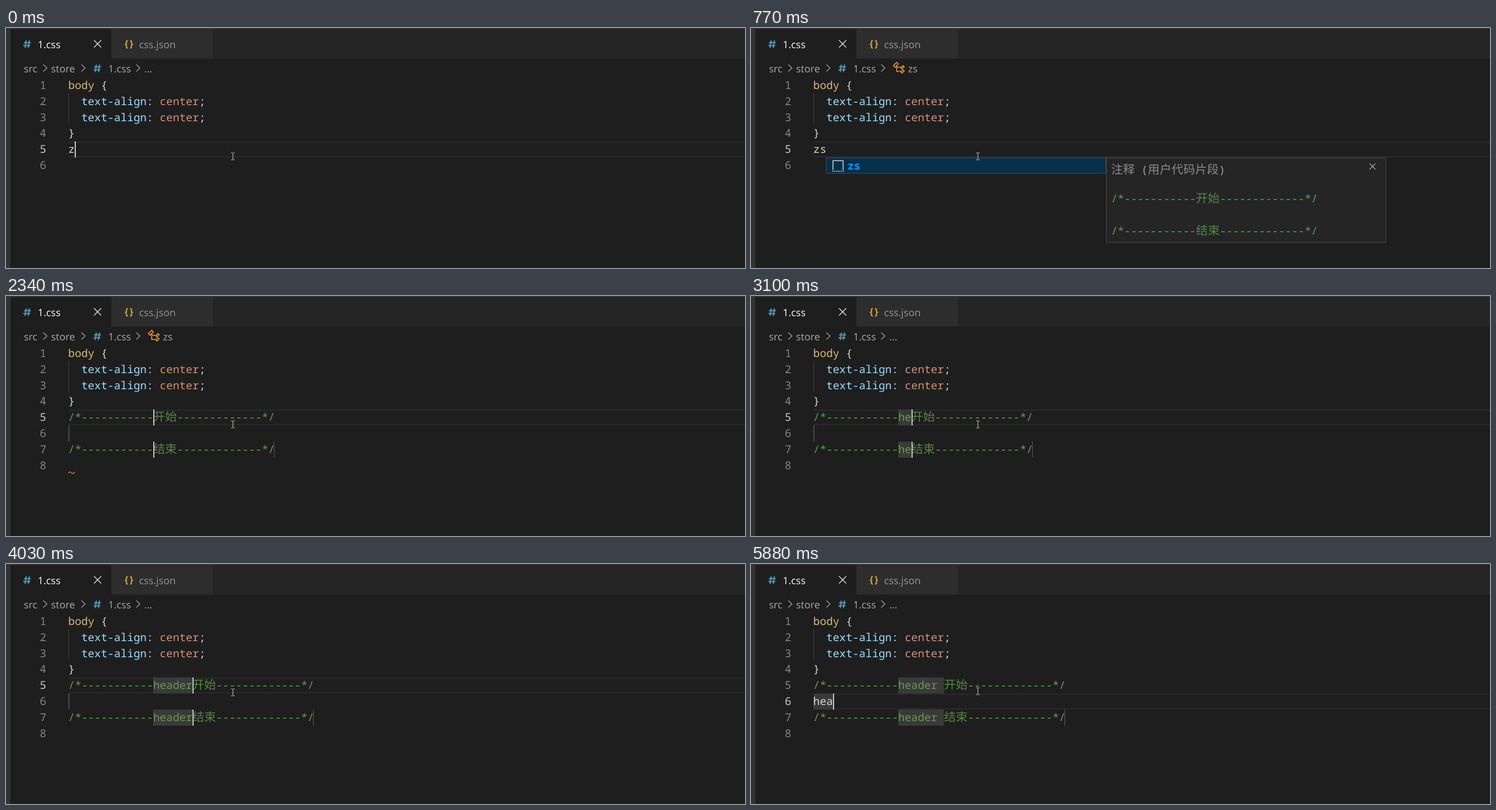
An HTML page with a canvas that plays this animation: 1280 px wide and 417 px high, repeating every 6050 ms.

```html
<!DOCTYPE html>
<html lang="zh">
<head>
<meta charset="utf-8">
<title>CSS snippet demo</title>
<style>
html, body { margin: 0; width: 100%; height: 100%; overflow: hidden; background: #1e1e1e; }
canvas { display: block; width: 1280px; height: 417px; }
</style>
</head>
<body>
<canvas id="stage"></canvas>
<script>
const W = 1280, H = 417, LOOP = 6050;
const canvas = document.getElementById("stage");
const ctx = canvas.getContext("2d");
const dpr = window.devicePixelRatio || 1;
canvas.width = W * dpr;
canvas.height = H * dpr;

const LEFT = 107.85, CW = 11.315, CJK = 20.5, LH = 28;
const MONO = '18.86px "Noto Sans Mono", "DejaVu Sans Mono", monospace';
const HAN = '300 20.5px "Noto Sans CJK SC Light", "Noto Sans CJK SC", "Noto Sans CJK", sans-serif';
const UI = '17.4px "Open Sans", "Noto Sans", sans-serif';
const FG = "#d4d4d4", GREEN = "#629b4d", HASH = "#519aba";

const colX = c => LEFT + c * CW;
const lineTop = n => Math.round(85.3 + 27.9 * (n - 1));
const baseline = n => Math.round(105.75 + 27.9 * (n - 1));

function rect(x, y, w, h, color) {
  ctx.fillStyle = color;
  ctx.fillRect(x, y, w, h);
}

function stroke(points, color, width, close) {
  ctx.beginPath();
  points.forEach(([x, y], i) => i ? ctx.lineTo(x, y) : ctx.moveTo(x, y));
  if (close) ctx.closePath();
  ctx.strokeStyle = color;
  ctx.lineWidth = width;
  ctx.stroke();
}

function label(text, x, y, color, font = UI) {
  ctx.font = font;
  ctx.fillStyle = color;
  ctx.fillText(text, x, y);
}

// Monospace text on the editor grid; returns the x after the last glyph.
function code(text, x, y, color, weight = 500) {
  for (const ch of text) {
    const wide = ch > "\u2fff";
    ctx.globalAlpha = wide ? 0.82 : 1;
    label(ch, x, y, color, wide ? HAN : weight + " " + MONO);
    x += wide ? CJK : CW;
  }
  ctx.globalAlpha = 1;
  return x;
}

function hash(x, y) {
  const bar = (a, b, c, d) => stroke([[x + a, y + b], [x + c, y + d]], HASH, 2);
  bar(5, 0, 3, 13);
  bar(10.5, 0, 8.5, 13);
  bar(1, 4, 13, 4);
  bar(0, 9, 12, 9);
}

function cross(x, y, r, color, width) {
  stroke([[x - r, y - r], [x + r, y + r]], color, width);
  stroke([[x + r, y - r], [x - r, y + r]], color, width);
}

function chevron(x) {
  stroke([[x, 63.5], [x + 6.5, 69.5], [x, 75.5]], "#a0a0a0", 1.3);
}

function classIcon() {
  const s = 1.44;
  const draw = (pts, close) =>
    stroke(pts.map(([x, y]) => [244.6 + x * s, 57.6 + y * s]), "#ee9d28", 1.5, close);
  draw([[1.4, 5.4], [5.4, 1.4], [7.4, 3.4], [3.4, 7.4]], true);
  draw([[5.4, 5.4], [5.4, 12.4], [10.4, 12.4]]);
  draw([[5.4, 7.3], [10.4, 7.3]]);
  for (const d of [0, 5])
    draw([[10.4, 8 + d], [13, 5.4 + d], [14.4, 6.7 + d], [11.7, 9.4 + d]], true);
}

function frameChrome() {
  rect(0, 0, W, H, "#1e1e1e");
  rect(7, 1, W - 7, 52, "#252526");
  rect(7, 1, 175, 52, "#1e1e1e");
  rect(183, 1, 175, 52, "#2d2d2d");
  rect(0, 0, 7.5, H, "#333333");
  rect(0, 0, W, 1.5, "#383838");

  hash(30, 21.5);
  label("1.css", 55, 35, "#ffffff");
  cross(158.7, 27.5, 6.2, "#dedede", 1.4);
  const brace = 'bold 16.5px "Noto Sans Mono", "DejaVu Sans Mono", monospace';
  label("{", 203.5, 33, "#d0a440", brace);
  label("}", 212.6, 33, "#d0a440", brace);
  label("css.json", 230.5, 35, "#969696");
}

function breadcrumbs(symbol) {
  const gray = "#a9a9a9";
  label("src", 31, 76.5, gray);
  chevron(64.5);
  label("store", 78, 76.5, gray);
  chevron(130.5);
  hash(151.5, 63.5);
  label("1.css", 177, 76.5, gray);
  chevron(225.5);
  if (symbol) {
    classIcon();
    label("zs", 272, 76.5, gray);
  } else {
    label("...", 239.5, 76.5, gray);
  }
}

function gutter(count, active) {
  for (let n = 1; n <= count; n++)
    code(String(n), 58.4, baseline(n), n === active ? "#c6c6c6" : "#858585");
  const y = lineTop(active);
  rect(108, y, W - 108, 2.6, "#282828");
  rect(108, y + LH - 2.6, W - 108, 2.6, "#282828");
}

function rules() {
  rect(108, 113, 1, 55, "#404040");
  const x = code("body ", LEFT, baseline(1), "#d7ba7d");
  code("{", x, baseline(1), FG);
  for (const n of [2, 3]) {
    const y = baseline(n);
    code("text-align", colX(2), y, "#9cdcfe");
    code(":", colX(12), y, FG);
    code("center", colX(14), y, "#ce9178");
    code(";", colX(20), y, FG);
  }
  code("}", LEFT, baseline(4), FG);
}

function comment(word, mark, x, y) {
  return code("/*" + "-".repeat(11) + word + mark + "-".repeat(13) + "*/", x, y, GREEN);
}

function tabstop(col, len, n) {
  const x = Math.round(colX(col));
  rect(x, lineTop(n), len ? len * CW : 2, LH, len ? "#3a3a3a" : "#484848");
}

function caret(col, n) {
  rect(Math.round(colX(col)), lineTop(n), 2, LH, "#c4c5c3");
}

function squiggle(n) {
  const y = lineTop(n) + 26;
  ctx.beginPath();
  ctx.moveTo(108, y + 1);
  ctx.bezierCurveTo(110, y - 3, 112, y - 1, 113.5, y + 0.5);
  ctx.bezierCurveTo(115, y + 2, 117, y + 1.5, 119, y - 1);
  ctx.strokeStyle = "#e0795c";
  ctx.lineWidth = 1.3;
  ctx.stroke();
}

function box(x, y, w, h, fill) {
  rect(x, y, w, h, "#4a4a4a");
  rect(x + 1, y + 1, w - 2, h - 2, fill);
}

function suggest(typed) {
  ctx.save();
  ctx.translate(typed === "z" ? -11 : 0, 0);
  box(130, 225, 485, 28, "#062f4a");
  stroke([[142, 247], [142, 230.5], [159.5, 230.5], [159.5, 247]], FG, 1.5);
  for (let x = 141; x < 160; x += 3) rect(x, 248, 1.6, 1.6, FG);
  const x = code(typed, 167, 246, "#0097fb", "bold");
  code("zs".slice(typed.length), x, 246, FG);

  box(615, 225, 485, 148, "#252526");
  code("注释 (用户代码片段)", 623.7, 253, "#a0a0a0");
  cross(1076.5, 240.5, 5, "#a8a8a8", 1.2);
  comment("", "开始", 623.7, 303);
  comment("", "结束", 623.7, 359);
  ctx.restore();
}

function pointer(y) {
  const c = "#cfcfcf";
  rect(392.5, y + 1, 1, 11, c);
  for (const dy of [0, 12]) {
    rect(390, y + dy, 2.5, 1, c);
    rect(393.5, y + dy, 2.5, 1, c);
  }
}

// Latest value whose start time has passed.
const at = (t, steps) => steps.reduce((v, [start, value]) => t >= start ? value : v, "");

const TRIGGER = [[0, "z"], [310, "zs"]];
const NAME = [[3100, "he"], [3740, "hea"], [3880, "heade"], [4030, "header"], [4350, "header "]];
const BODY = [[5730, "h"], [5880, "hea"]];
const HIDDEN = [[770, 1410], [1870, 2340], [3400, 3740], [5260, 5730]];

function draw(t) {
  const expanded = t >= 2340, inside = t >= 4640;
  const caretOn = !HIDDEN.some(([a, b]) => t >= a && t < b);

  ctx.setTransform(dpr, 0, 0, dpr, 0, 0);
  ctx.textRendering = "geometricPrecision";
  frameChrome();
  breadcrumbs(t >= 770 && t < 2650);
  gutter(expanded ? 8 : 6, inside ? 6 : 5);
  rules();

  if (!expanded) {
    const typed = at(t, TRIGGER);
    code(typed, LEFT, baseline(5), FG);
    if (t >= 1090) squiggle(6);
    if (caretOn) caret(typed.length, 5);
    if (t >= 160) suggest(typed);
  } else {
    const name = at(t, NAME), body = at(t, BODY);
    tabstop(13, name.length, 5);
    tabstop(13, name.length, 7);
    tabstop(0, body.length, 6);
    comment(name, "开始", LEFT, baseline(5));
    code(body, LEFT, baseline(6), FG);
    const end = comment(name, "结束", LEFT, baseline(7));
    rect(Math.floor(end - 0.9), lineTop(7), 1, LH, "#5a5a5a");
    if (t < 2820) squiggle(8);
    if (caretOn) {
      if (inside) caret(body.length, 6);
      else for (const n of [5, 7]) caret(13 + name.length, n);
    }
  }
  pointer(t < 4500 ? 216.5 : 214.5);
}

const start = performance.now();
function tick() {
  draw((performance.now() - start) % LOOP);
  requestAnimationFrame(tick);
}
tick();
</script>
</body>
</html>
```
